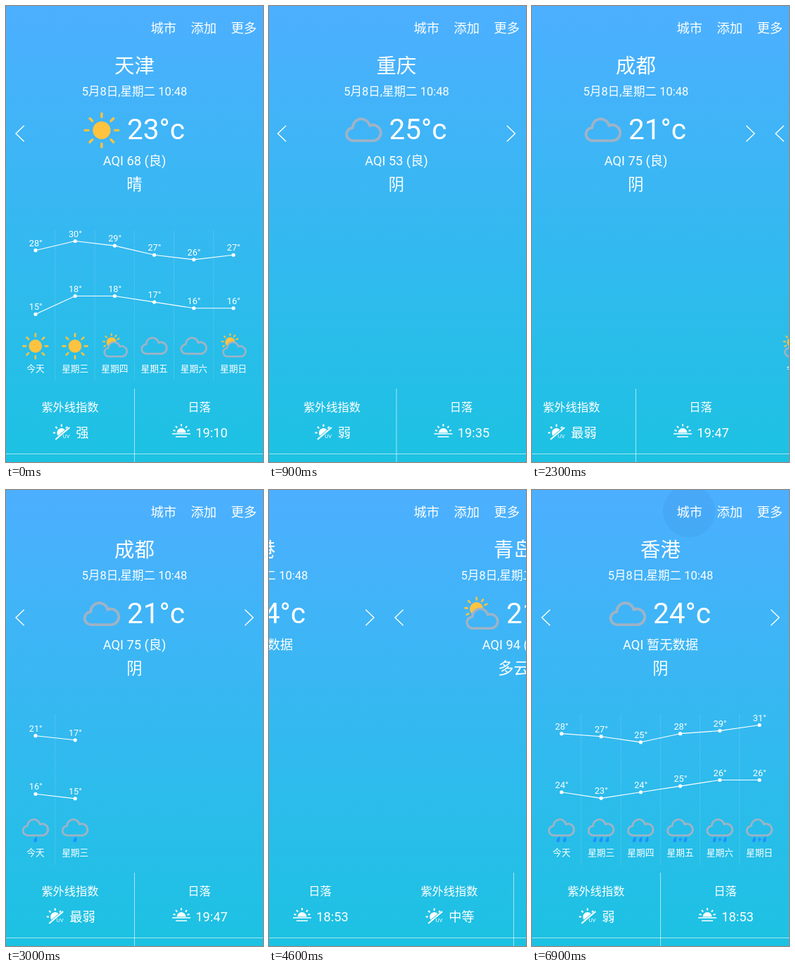
Write an HTML page that moves like this. It is 365x647 px and loops after 7.2 s.

```html
<!DOCTYPE html>
<html lang="zh-CN">
<head>
<meta charset="utf-8">
<title>天气</title>
<style>
  html, body { margin: 0; width: 100%; height: 100%; overflow: hidden; }
  body { background: #1cc2e2; }
  svg { display: block; }
  text { font-family: Roboto, "Noto Sans CJK SC", "Noto Sans CJK", sans-serif; fill: #fff; white-space: pre; }
  .mid { text-anchor: middle; }
  .line { fill: none; stroke: #fff; }
  .cloud { fill: none; stroke: #9fb3c5; stroke-width: 3.8; stroke-linejoin: round; }
  .ray { stroke: #ffc340; stroke-width: 3.4; stroke-linecap: round; }
  .disc { fill: #ffc340; }
  .wet { fill: #1e8fff; }
</style>
</head>
<body>
<svg id="stage" width="365" height="647" viewBox="0 0 365 647"></svg>
<script>
const LOOP = 7200, TICK = 100, PITCH = 367;
const COL = 56.2, FIRST = 42;
const DAYS = ['今天', '星期三', '星期四', '星期五', '星期六', '星期日'];
const CLOUD = 'M10.5 33A9 9 0 0 1 9.8 15A12 12 0 0 1 33.5 12A11 11 0 1 1 39 33Z';

const pages = [
  { city: '天津', temp: 23, aqi: '68 (良)', sky: '晴', icon: 'sun', uv: '强', sunset: '19:10',
    high: [28, 30, 29, 27, 26, 27], low: [15, 18, 18, 17, 16, 16],
    icons: ['sun', 'sun', 'partly', 'cloud', 'cloud', 'partly'], from: 0, cols: [6] },
  { city: '重庆', temp: 25, aqi: '53 (良)', sky: '阴', icon: 'cloud', uv: '弱', sunset: '19:35',
    high: [31, 24, 27, 24, 27, 32], low: [19, 20, 21, 21, 19, 21],
    icons: ['partly', 'rain1', 'rain1', 'storm', 'rain1', 'partly'], from: 1200, cols: [4, 6] },
  { city: '成都', temp: 21, aqi: '75 (良)', sky: '阴', icon: 'cloud', uv: '最弱', sunset: '19:47',
    high: [21, 17, 23, 27, 29, 31], low: [16, 15, 16, 17, 18, 19],
    icons: ['rain1', 'rain1', 'cloud', 'cloud', 'partly', 'partly'], from: 3000, cols: [2, 4, 6] },
  { city: '青岛', temp: 21, aqi: '94 (良)', sky: '多云', icon: 'partly', uv: '中等', sunset: '18:51' },
  { city: '香港', temp: 24, aqi: '暂无数据', sky: '阴', icon: 'cloud', uv: '弱', sunset: '18:53',
    high: [28, 27, 25, 28, 29, 31], low: [24, 23, 24, 25, 26, 26],
    icons: ['rain2', 'rain3', 'rain3', 'storm', 'storm', 'storm'], from: 5700, cols: [2, 3, 5, 6] }
];

// Drag followed by a decelerating settle: distance travelled at each tick.
const swipes = [
  { from: 300, path: [30, 105, 200, 280, 328, 354, 365.5, PITCH] },
  { from: 1900, path: [48, 140, 225, 290, 332, 354, 364, PITCH] },
  { from: 3400, path: [55, 150, 242, 308, 345, 362, PITCH] },
  { from: 4300, path: [20, 60, 110, 165, 220, 270, 310, 338, 353, 361.5, 365.5, PITCH] }
];

const label = (s, x, y, size, cls = 'mid') =>
  `<text class="${cls}" x="${x}" y="${y}" font-size="${size}">${s}</text>`;
const stroke = (d, width = 1, opacity = 1) =>
  `<path class="line" d="${d}" stroke-width="${width}" stroke-opacity="${opacity}"/>`;
const icon = (name, x, y, scale) =>
  `<use href="#${name}" transform="translate(${x} ${y}) scale(${scale})"/>`;

function rays(cx, cy, r1, r2, angles) {
  return angles.map(a => {
    const c = Math.cos(a * Math.PI / 180), s = Math.sin(a * Math.PI / 180);
    return `M${cx + r1 * c} ${cy + r1 * s}L${cx + r2 * c} ${cy + r2 * s}`;
  }).join('');
}

function symbols() {
  const all = [0, 45, 90, 135, 180, 225, 270, 315];
  const lowCloud = `<path class="cloud" d="${CLOUD}" transform="translate(0 2)"/>`;
  const drop = x => `<path class="wet" transform="translate(${x} 43)"
    d="M2.2-6C3.6-1.5 3.8 5-.6 5C-5 5-3.6-1.5 2.2-6Z"/>`;
  const bolt = '<path class="wet" d="M27 37L21.5 44H25L23 49L29.5 41.5H25.5Z"/>';
  const group = (id, body) => `<g id="${id}">${body}</g>`;
  return `<defs>
    <linearGradient id="sky" x2="0" y2="1">
      <stop stop-color="#4dafff"/><stop offset="1" stop-color="#1cc2e2"/>
    </linearGradient>
    <clipPath id="behind">
      <path clip-rule="evenodd" transform="translate(4.5 15) scale(.9)" d="M-20-30H80V70H-20Z${CLOUD}"/>
    </clipPath>` +
    group('sun', `<circle class="disc" cx="25" cy="25" r="12.5"/>
      <path class="ray" d="${rays(25, 25, 18.5, 23.5, all)}"/>`) +
    group('cloud', `<path class="cloud" d="${CLOUD}" transform="translate(0 6.5)"/>`) +
    group('partly', `<g clip-path="url(#behind)"><circle class="disc" cx="19" cy="17.5" r="9.5"/>
      <path class="ray" style="stroke-width:2.6" d="${rays(19, 17.5, 13, 16, [150, 185, 225, 270, 305, 335])}"/></g>
      <path class="cloud" d="${CLOUD}" transform="translate(4.5 15) scale(.9)"/>`) +
    group('rain1', lowCloud + drop(25)) +
    group('rain2', lowCloud + drop(19) + drop(31)) +
    group('rain3', lowCloud + drop(13) + drop(25) + drop(37)) +
    group('storm', lowCloud + drop(15) + bolt + drop(35)) +
    group('uv', `<path fill="#fff" d="M7.5 16.7A6.5 6.5 0 0 1 17.5 8.3Z"/>` +
      stroke('M4 22L24 5', 2) + stroke(rays(12.5, 12.5, 8.8, 12, [180, 225, 270, 315]), 2.2) +
      label('UV', 14.5, 20, 7.6, '')) +
    group('sunset', `<path fill="#fff" d="M6.5 12.6A6.5 6.5 0 0 1 19.5 12.6Z"/>` +
      stroke(rays(13, 12, 8.8, 12, [195, 228, 270, 312, 345]), 2) +
      stroke('M0 14H26M5 18.2H21', 1.6)) +
    '</defs>';
}

// Whole-unit steps per degree, so the curve may stop short of the full height.
function levels(values, top) {
  const max = Math.max(...values), step = Math.floor(52 / (max - Math.min(...values)));
  return values.map(v => top + (max - v) * step * .507);
}

function chart(p) {
  if (!p.high) return '';
  const curves = [[p.high, levels(p.high, 333.5)], [p.low, levels(p.low, 411.5)]];
  return DAYS.map((day, i) => {
    const x = FIRST + COL * i;
    let out = i ? stroke(`M${x - 28.3} 318V532`, 1, .13) : '';
    for (const [values, ys] of curves) {
      if (i) out += stroke(`M${x - COL} ${ys[i - 1]}L${x} ${ys[i]}`, 1.1);
      out += `<circle cx="${x}" cy="${ys[i]}" r="2.6" fill="#fff"/>` +
        label(values[i] + '°', x + .3, ys[i] - 6, 12.7);
    }
    return `<g class="col">${out}${icon(p.icons[i], x - 18.8, 464, .745)}${label(day, x, 518.5, 12.7)}</g>`;
  }).join('');
}

function page(p, i) {
  const uvX = 108.5 - p.uv.length * 9.13;
  return '<g class="page">' +
    label(p.city, 182.5, 94.5, 28.4) +
    label('5月8日,星期二 10:48', 182.5, 127, 16.5) +
    icon(p.icon, 110.5, 151, 1.014) +
    label(p.temp + '°c', 172, 189, 40.56, '') +
    label('AQI ' + p.aqi, 182.5, 226.3, 18.25) +
    label(p.sky, 182.5, 260.5, 22.3) +
    stroke('M25.7 169.7L14 181L25.7 192.3', 1.4) +
    (i ? stroke('M339.3 169.7L351 181L339.3 192.3', 1.4) : '') +
    chart(p) +
    stroke('M182.5 543V647', 1, .6) +
    label('紫外线指数', 91, 575, 16.25) +
    icon('uv', uvX - 33, 593, 1) + label(p.uv, uvX, 612.3, 18.25, '') +
    label('日落', 274.5, 575, 16.25) +
    icon('sunset', 236, 593, 1) + label(p.sunset, 269.3, 612.3, 18.25, '') +
    '</g>';
}

const stage = document.getElementById('stage');
stage.innerHTML = symbols() +
  '<rect width="365" height="647" fill="url(#sky)"/>' +
  '<circle id="ripple" cx="223" cy="30" r="0" fill="#1450a0" fill-opacity=".07"/>' +
  pages.map(page).join('') +
  stroke('M0 635.5H365', 1, .6) +
  label('城市', 223.7, 38, 18.25) + label('添加', 280.7, 38, 18.25) + label('更多', 337.7, 38, 18.25);

const ripple = document.getElementById('ripple');
const views = [...stage.querySelectorAll('.page')].map(el => ({ el, cols: [...el.querySelectorAll('.col')] }));

// Value of a stepped track at time t, holding its last entry.
function stepped(from, list, t) {
  const n = Math.floor((t - from) / TICK);
  return n < 0 ? 0 : list[Math.min(n, list.length - 1)];
}

function draw(now) {
  const t = Math.floor((now % LOOP) / TICK) * TICK;
  const scroll = swipes.reduce((sum, s) => sum + stepped(s.from, s.path, t), 0);
  views.forEach(({ el, cols }, i) => {
    const x = scroll - PITCH * i, p = pages[i];
    el.setAttribute('transform', `translate(${x} 0)`);
    el.style.display = Math.abs(x) < PITCH ? '' : 'none';
    const shown = p.cols ? stepped(p.from, p.cols, t) : 0;
    cols.forEach((c, k) => { c.style.display = k < shown ? '' : 'none'; });
  });
  ripple.setAttribute('r', stepped(6600, [25, 37], t));
}

let start;
function tick(now) {
  start ??= now;
  draw(now - start);
  requestAnimationFrame(tick);
}
draw(0);
requestAnimationFrame(tick);
</script>
</body>
</html>
```
